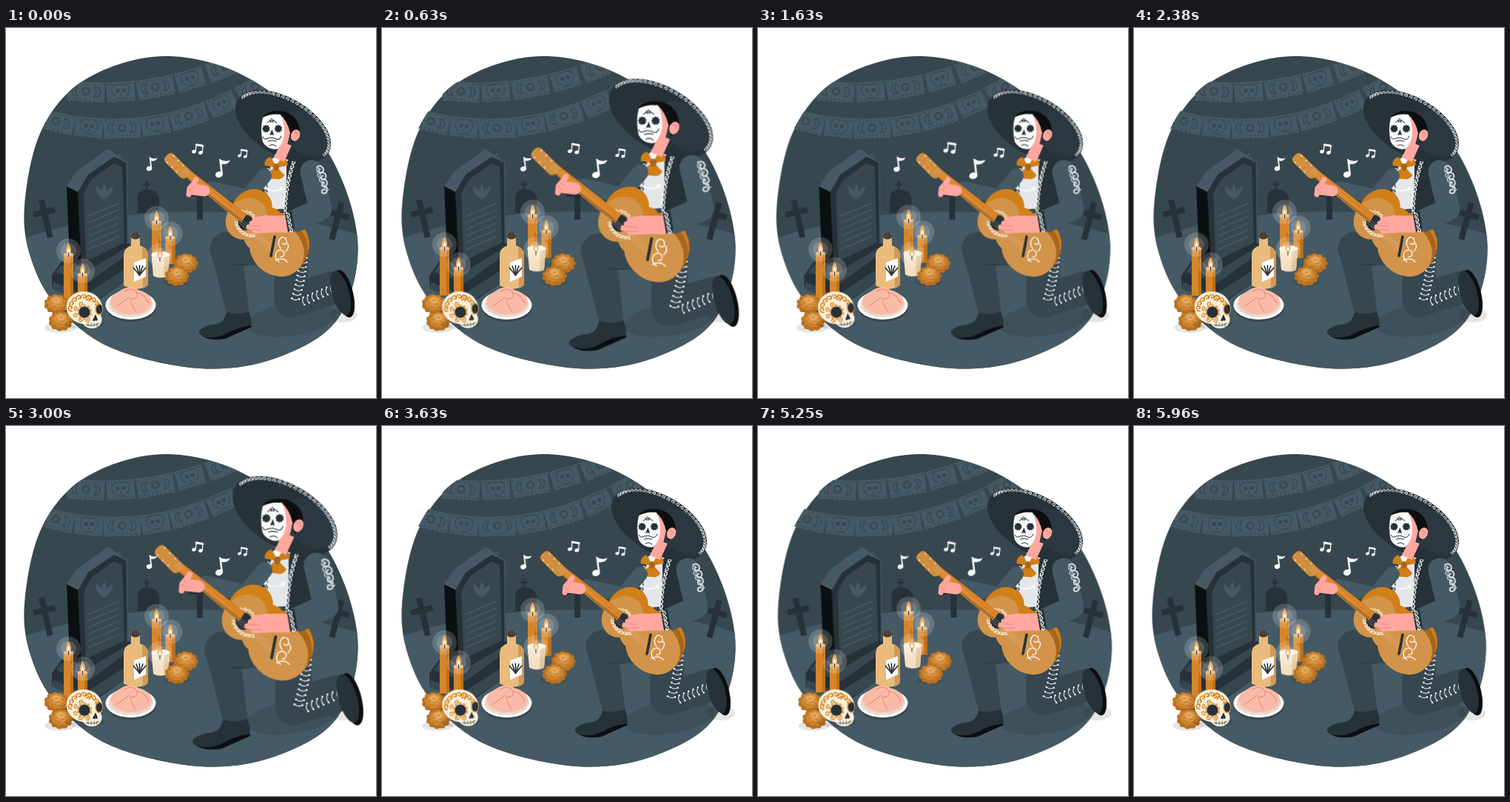
An HTML page that plays this animation: 500 by 500 pixels, repeating every 6000 ms.

```html
<!DOCTYPE html>
<html lang="en">
<head>
<meta charset="utf-8">
<title>Guitar serenade by the grave</title>
<style>
html, body { margin: 0; width: 100%; height: 100%; overflow: hidden; background: #fff; }
svg { display: block; width: 100vw; height: 100vh; }
g { transform-box: view-box; }
</style>
</head>
<body>
<svg id="stage" viewBox="0 0 500 500"></svg>
<script>
const INK = '#263238', SLATE = '#37474f', STEEL = '#455a64', BLACK = '#0c0f11';
const ORANGE = '#d17f18', WOOD = '#d2944a', DARKWOOD = '#a8651c', TAN = '#e5ab62';
const SKIN = '#ffa8a0', BLUSH = '#e77f78', WHITE = '#fafafa';

// Smooth closed curve through points "x,y x,y ..."
function curve(text) {
  const p = text.split(' ').map(s => s.split(',').map(Number));
  const at = i => p[(i + p.length) % p.length];
  const bend = (a, b, c, k) => b.map((v, j) => v + k * (c[j] - a[j]) / 6);
  return `M${p[0]}` + p.map((b, i) => {
    const c = at(i + 1);
    return `C${bend(at(i - 1), b, c, 1)} ${bend(b, c, at(i + 2), -1)} ${c}`;
  }).join('') + 'Z';
}
const path = (d, fill, more = '') => `<path d="${d}" fill="${fill}" ${more}/>`;
const shape = (pts, fill) => path(curve(pts), fill);
const poly = (pts, fill) => `<polygon points="${pts}" fill="${fill}"/>`;
const line = (d, color, w = 1, cap = 'round') =>
  path(d, 'none', `stroke="${color}" stroke-width="${w}" stroke-linecap="${cap}" stroke-linejoin="round"`);
const oval = (x, y, rx, ry, fill, turn = 0, more = '') =>
  `<ellipse rx="${rx}" ry="${ry}" fill="${fill}" transform="translate(${x} ${y}) rotate(${turn})" ${more}/>`;
const dot = (x, y, r, fill, more) => oval(x, y, r, r, fill, 0, more);
const shade = (x, y, rx, ry, turn = 0) => oval(x, y, rx, ry, '#000', turn, 'opacity=".1"');
const place = (x, y, turn, body, size = 1) =>
  `<g transform="translate(${x} ${y}) rotate(${turn}) scale(${size})">${body}</g>`;
const group = (id, body) => `<g id="${id}">${body}</g>`;
const inside = body => `<g clip-path="url(#inside)">${body}</g>`;
const repeat = (n, f) => Array.from({ length: n }, (_, i) => f(i)).join('');
const degrees = (dy, dx) => Math.atan2(dy, dx) * 180 / Math.PI;

const ring = (x, y, r, n, size, color, flat = 1) => repeat(n, i => {
  const a = i * 2 * Math.PI / n + r;
  return oval(x + r * Math.cos(a), y + flat * r * Math.sin(a), size, size * flat, color);
});

// Tracks give a point for t in 0..1
const bow = (x1, y1, x2, y2, sag = 0) => t => {
  const k = 4 * sag * t * (1 - t) / Math.hypot(x2 - x1, y2 - y1);
  return [x1 + (x2 - x1) * t + (y2 - y1) * k, y1 + (y2 - y1) * t - (x2 - x1) * k];
};
const rim = (cx, cy, rx, ry, turn, from, to) => t => {
  const a = (from + (to - from) * t) * Math.PI / 180, b = turn * Math.PI / 180;
  const u = rx * Math.cos(a), v = ry * Math.sin(a);
  return [cx + u * Math.cos(b) - v * Math.sin(b), cy + u * Math.sin(b) + v * Math.cos(b)];
};
const curls = (track, n, size, color = WHITE) => repeat(n, i => {
  const t = i / (n - 1), [x, y] = track(t), [u, v] = track(t + .01);
  return place(x, y, degrees(v - y, u - x), line('M-1 .6C-1.2-1 .8-1.2.9 0C.9.8-.2.8-.1.1', color, .42), size);
});

const BLOB = curve('215,38 330,69 430,160 475,285 449,392 365,446 262,460 142,432 69,376 34,312 25,240 48,138 108,69');

function flag(skull) {
  const w = skull ? 38 : 50;
  const holes = repeat(9, i => dot((i - 4) * (w - 6) / 8, -10.5, .9, SLATE) + dot((i - 4) * (w - 6) / 8, 10, .9, SLATE));
  const half = side => place(0, 0, 0, line('M11-7Q19-8 19 0Q18 7 11 6Q17 0 11-7', SLATE, 1.3)).replace('scale(1)', `scale(${side} 1)`);
  const art = skull
    ? dot(-4, -2, 2.6, SLATE) + dot(4, -2, 2.6, SLATE) + poly('0,2 -1.5,5 1.5,5', SLATE) +
      line('M-5 8H5M-12-5Q-9-12 0-10Q9-12 12-5Q12 3 7 6M-12-5Q-12 3-7 6', SLATE, 1.1)
    : ring(0, -1, 4.5, 8, 1.6, SLATE) + half(1) + half(-1);
  return path(`M${-w / 2}-13H${w / 2}V12` + repeat(8, () => `l${-w / 16} 2l${-w / 16}-2`) + 'Z', STEEL) + holes + art;
}
// Flags hang along the parabola y = low - (x - mid)^2 / wide
function garland(first, step, n, low, mid, wide, odd) {
  const y = x => low - (x - mid) ** 2 / wide;
  const rope = repeat(30, i => `${i ? 'L' : 'M'}${20 + i * 12} ${y(20 + i * 12) - 13}`);
  return line(rope, STEEL) + repeat(n, i => {
    const x = first + step * i;
    return place(x, y(x), degrees(-2 * (x - mid), wide), flag(i % 2 === odd));
  });
}
const banners = garland(108, 47, 5, 87, 130, 815, 1) + garland(67, 45, 7, 136, 145, 658, 1);

const cross = (x, y, turn) => place(x, y, turn, path('M-4-18H4V-5H15V3H4V34H-4V3H-15V-5H-4Z', INK));
const graves = cross(52, 250, -13) + cross(449, 253, 15) + cross(262, 225, 0) +
  path('M178 250V229Q179 218 191 218Q205 219 207 230V250Z', INK) + line('M190 208V218M186.5 211.5H193.5', INK, 2.4);

const tomb = poly('75,316 165,290 176,300 176,331 115,375 62,350 62,334', INK) +
  poly('75,320 101,334 166,295 174,299 110,345 68,330', SLATE) +
  poly('64,343 106,361 176,316 176,331 112,375 62,352', SLATE) +
  poly('82,214 98,200 103,324 86,314', BLACK) +
  poly('82,214 95,194 138,163 162,181 113,196 98,222', STEEL) +
  poly('97,222 111,198 146,174 162,181 165,295 102,324', INK) +
  poly('105,223 116,204 146,183 157,188 160,290 108,315', SLATE) +
  line('M150 173L154 170Q153 179 164 181V291', STEEL, 1.2) +
  repeat(3, i => place(132, 232, (i - 1) * 32, path('M0 0Q-6-12 1-22Q7-12 0 0Z', STEEL))) +
  repeat(6, i => line(`M112 ${254 + i * 9}l40-17`, STEEL, 1.5));

const flame = (x, y) => dot(x, y, 16.5, '#fff', 'opacity=".18"') + dot(x, y, 10.5, '#fff', 'opacity=".15"') +
  [[10, 7, '#f2b266'], [4, 4, '#fff3df']].map(([h, w, color]) =>
    path(`M${x} ${y - h}Q${x + w} ${y + 1} ${x} ${y + 5}Q${x - w} ${y + 1} ${x} ${y - h}Z`, color)).join('') +
  line(`M${x} ${y + 8}V${y + 3}`, INK);
const candle = (x, y, h) => path(`M${x - 6.5} ${y}h13v${h}h-13Z`, '#d5852a') +
  path(`M${x + 2.5} ${y}h4v${h}h-4Z`, '#bd7019') + oval(x, y, 6.5, 2.4, TAN) + flame(x, y - 5);
const candles = candle(203.5, 262, 54) + candle(222, 283, 36) + candle(84.5, 306, 64) + candle(103.5, 333, 42) +
  path('M196.5 306h25l-2.500 29q-10 5-20 0Z', '#f3dfc3') + path('M214 306h7.500l-2.500 29q-3 2-6 2Z', '#e2c69e') +
  oval(209, 306, 12.5, 4, '#fbf0df') + flame(208, 307);

const marigold = (x, y) => ['#b9701f', '#cb8430', '#d99645', TAN].map((color, i) =>
  oval(x, y - i, 13 - 3.5 * i, 10 - 3 * i, color) + ring(x, y + 1 - 1.6 * i, 12 - 3.2 * i, 11 - 2 * i, 4.5 - .5 * i, color, .82)).join('') +
  repeat(7, i => line(`M${x - 11 + i * 3} ${y - 6 + i * 5 % 13}q2 2 4-.5`, '#b06a1e', .8));

const bottle = path('M169 278H181V294Q191 297 192 305V347Q178 358 159 348V306Q160 297 169 294Z', '#eabb7c') +
  path('M184 296Q191 298 192 305V347Q189 351 185 352Z', '#d09a55') +
  oval(175, 281, 6.5, 4.5, '#4a4038') + poly('173,317 189,311 189,336 173,343', WHITE) +
  repeat(5, i => place(180.5, 334, (i - 2) * 20, line('M0 0V-13', INK, 1.6)));

const plate = oval(169, 378, 34, 19, SLATE) + oval(168.5, 374.5, 34, 19.5, WHITE) + oval(168.5, 374, 30, 16.5, '#ead7cc') +
  oval(169, 370, 28, 17, '#f9bba8') + oval(164, 359, 15, 8, '#f9bba8', -15) +
  line('M160 356Q170 350 176 357Q181 367 168 366Q170 376 175 382M166 364Q155 373 149 376M178 358Q188 361 193 372', '#e7917f', 1.2);

const BONE = '#fbefdb';
const skull = oval(106, 378, 24.5, 22, BONE, 12) + oval(116, 394, 13.5, 12, BONE) +
  ring(106, 384, 8.5, 10, 2.3, '#e2a55c') + dot(106, 384, 7.6, INK) +
  oval(125.5, 380, 5.4, 8, '#e2a55c') + oval(126, 380, 4.2, 6.6, INK) +
  path('M121 387L117 395Q119 397 121 395Q123 397 124 394Z', INK) +
  line('M108 401Q118 404 126 399' + repeat(4, i => `M${111 + 4 * i} 399v4`), INK, .7) +
  curls(rim(106, 380, 19, 17, 12, 170, 320), 8, 3.4, ORANGE) + curls(rim(106, 384, 13, 12, 0, 70, 250), 5, 2.6, ORANGE) +
  ring(112, 365, 3.5, 6, 1.3, ORANGE);

const single = (x, y, size) => place(x, y, 0, oval(0, 0, 3.8, 3, WHITE, -15) +
  path('M2 0L0-16Q5-12 11-14.500Q9-9.500 2.500-10.500L3.800 0Z', WHITE), size);
const pair = (x, y, size) => place(x, y, 0, oval(0, 0, 2.9, 2.3, WHITE, -15) + oval(9, 1.5, 2.9, 2.3, WHITE, -15) +
  line('M2.300 0L3-10L12-8.500L11.300 1', WHITE, 1.3) + line('M3-9L12-7.500', WHITE, 2.4), size);
const notes = single(193.5, 190, 1) + pair(254, 167, 1) + single(288, 198, 1.35) + pair(315.5, 172.5, .85);

const stud = (x, y, turn) => place(x, y, turn, line('M-5-1Q0 3 5 0', WHITE) + dot(-5, -1, 1.2, WHITE) + dot(5, 0, 1.2, WHITE));
const legs = line('M385 285V368L446 350', SLATE, 45, 'butt') +
  repeat(12, i => stud(402 - .09 * i * i, 298 + i * 6.2, 0)) + repeat(7, i => stud(402 + i * 6.3, 369 - i * 2.7, 75)) +
  oval(457, 359, 12, 33, BLACK, -14) + oval(452, 358, 11.5, 31, INK, -16) +
  line('M356 298H298', SLATE, 45) + path('M276 300L298 385Q313 394 329 388L320 312Z', SLATE) + line('M328 320H308', INK) +
  path('M261 412Q270 424 296 420L332 404L329 396Z', BLACK) +
  path('M298 384Q314 389 328 383Q333 394 331 402Q314 404 300 412Q283 421 268 417Q258 414 262 408Q270 401 285 400Q296 397 298 384Z', INK);

const torso = path('M352 184L376 168L402 176L414 200L404 280H350L334 232Q340 196 352 184Z', SLATE) +
  poly('360,176 384,166 378,244 352,246 354,202', '#e4e7e9') +
  path('M379 172L398 164Q412 178 412 215L405 268L373 262Q380 230 379 172Z', INK) +
  path('M357 180L343 202L344 240L352 243L354 205Z', INK) +
  curls(bow(393, 169, 377, 250, -4), 14, 2.8) + curls(bow(354, 192, 348, 236, 1), 8, 2.4) +
  line('M349 215Q362 224 373 217', WHITE, 1.5) + dot(349, 215, 2.6, WHITE) + dot(372, 217, 2.6, WHITE) +
  path('M361 182L364 167L384 160L382 178L372 188Z', WHITE) +
  [-55, 55, -150, 160].map(turn => place(365, 188, turn, path('M0 2L-7-14Q0-20 7-14Z', ORANGE))).join('') + oval(365, 188, 4, 5, DARKWOOD);

const hat = oval(374.5, 133, 71, 39, INK, 30) + oval(405, 143, 38, 26, '#2b383f', 40) +
  curls(rim(374.5, 133, 68, 36, 30, 192, 368), 30, 2.2);

const face = line('M369 178L379 156', SKIN, 15, 'butt') +
  path('M346 122Q353 109 377 113Q396 120 397 139L387 155L371 116L346 126Z', BLACK) +
  oval(391, 145, 6, 8, SKIN, 24) + line('M389 142Q394 139 394 146', BLUSH) +
  path('M369 116Q380 124 384 142L380 158L366 164Z', SKIN) +
  path('M347 121Q358 115 371 117Q377 129 376 145Q372 163 363 164Q352 163 347 154Q343 137 347 121Z', WHITE) +
  [351.5, 368].map(x => dot(x, 136, 4.5, INK) + ring(x, 136, 4.6, 9, .8, INK)).join('') +
  path('M359.5 137L356 145L359 144L362 145Z', INK) +
  line('M347 147Q349 152 354 149Q360 147 365 150Q370 152 372 146M354 153Q360 151 365 153M356 159Q361 156 365 160M353 128Q359 122 366 128', INK) +
  ring(359, 125, 2.2, 5, .9, INK);

// Back and front of the body share one figure-eight outline
const soundbox = (x, y, color) => place(x, y, 45, oval(-30, 0, 26, 30, color) + oval(28, 0, 40, 34, color) + oval(-2, 0, 22, 25, color));
const guitar = soundbox(353, 267, ORANGE) + oval(371, 293, 40, 34, DARKWOOD, 45) + soundbox(346, 279, WOOD) +
  dot(324, 263, 10.5, INK) + curls(bow(311, 264, 334, 281, -5), 7, 2.5) + curls(bow(319, 248, 337, 259, 4), 5, 2.2) +
  poly('234,195 242,187 325,252 318,263', DARKWOOD) + poly('234,193 242,187 325,252 320,259', '#d98326') +
  place(232, 187, 45, `<rect x="-21" y="-8" width="40" height="16" rx="6" fill="#d08e40"/>` +
    repeat(6, i => dot(-14 + 9 * (i % 3), i < 3 ? -6 : 6, 1.3, '#edc48d'))) +
  repeat(3, i => line(`M${238 + i * 2} ${194 - i * 2}L${359 + i * 2} ${302 - i * 2}`, '#f1d6ad', .4)) +
  line('M363 282L358 308', INK, 3.6) +
  line('M369 316Q361 310 366 302Q373 297 376 304Q376 310 371 309M371 298Q365 289 372 283Q380 282 379 290Q377 294 373 291M378 302Q384 296 380 291M364 314Q374 309 380 316', WHITE, 1.3);

const fretArm = line('M349 200L326 228L277 217', STEEL, 20);
const fretHand = line('M268 220L252 218', SKIN, 15) +
  repeat(4, i => line(`M${257 - i * 3} ${205 + i * 4}L${253 - i * 2} ${213 + i * 4}`, SKIN, 7)) +
  line('M250 212L255 217M247 217L253 222', BLUSH, .8);
const strumArm = line('M413 194L425 245L392 260', STEEL, 31) +
  line('M381 265H348', SKIN, 23, 'butt') + repeat(4, i => line(`M352 ${257 + i * 5.5}L${336 - i % 3 * 4} ${259 + i * 5}`, SKIN, 7)) +
  line('M330 267L344 268M333 273L346 273', BLUSH, .8) +
  poly('377,252 386,247 390,272 381,276', INK) + curls(bow(381, 253, 385, 273), 4, 2.8) +
  curls(bow(425, 191, 430, 219, 2), 4, 5, '#cfd5d8') + curls(bow(433, 217, 422, 192, 2), 5, 3, '#cfd5d8');

document.getElementById('stage').innerHTML =
  `<clipPath id="inside"><path d="${BLOB}"/></clipPath>` +
  group('scenery', path(BLOB, SLATE) +
    inside(oval(258, 420, 380, 172, STEEL) + graves + tomb + shade(386, 394, 62, 22, -8)) +
    shade(73, 405, 21, 7) + shade(230, 343, 18, 6) + shade(456, 388, 19, 10)) +
  inside(group('banners', banners)) +
  group('candles', candles) + bottle + plate +
  group('flowers', marigold(243, 317) + marigold(231, 334) + marigold(68, 372) + marigold(74, 395)) +
  shade(106, 400, 27, 7) + group('skull', skull) + group('notes', notes) +
  group('player', legs + torso + hat + face + fretArm + guitar + fretHand + strumArm);

// Each step: [time in ms, transform]
function move(id, origin, steps) {
  const el = document.getElementById(id), duration = steps[steps.length - 1][0];
  el.style.transformOrigin = origin;
  el.animate(steps.map(([t, transform]) => ({ offset: t / duration, transform })), { duration, iterations: Infinity });
}
const bob = (x, y) => [[0, 'translate(0px,0px)'], [750, `translate(${x}px,${y}px)`], [1500, 'translate(0px,0px)']];
const sway = f => [[0, f(0)], [630, f(.4)], [1600, f(1)], [2380, f(0)], [3000, f(0)]];
const pulse = (from, peak, to) => [[from, 'scale(1)'], [peak, 'scale(1.1)'], [to, 'scale(1)']];

move('candles', '0 0', bob(0, -10));
move('flowers', '0 0', bob(2.5, 0));
move('scenery', '0 0', bob(2.5, 0));
move('notes', '257px 181px', sway(k => `scale(${1 + .1 * k})`));
move('skull', '106px 384px', sway(k => `rotate(${-6 * k}deg)`));
move('banners', '0 0', sway(k => `translate(${-3 * k}px,0px)`));
move('player', '349px 253px', [...pulse(0, 690, 1650), ...pulse(2400, 2980, 3600), [6000, 'scale(1)']]);
</script>
</body>
</html>
```
